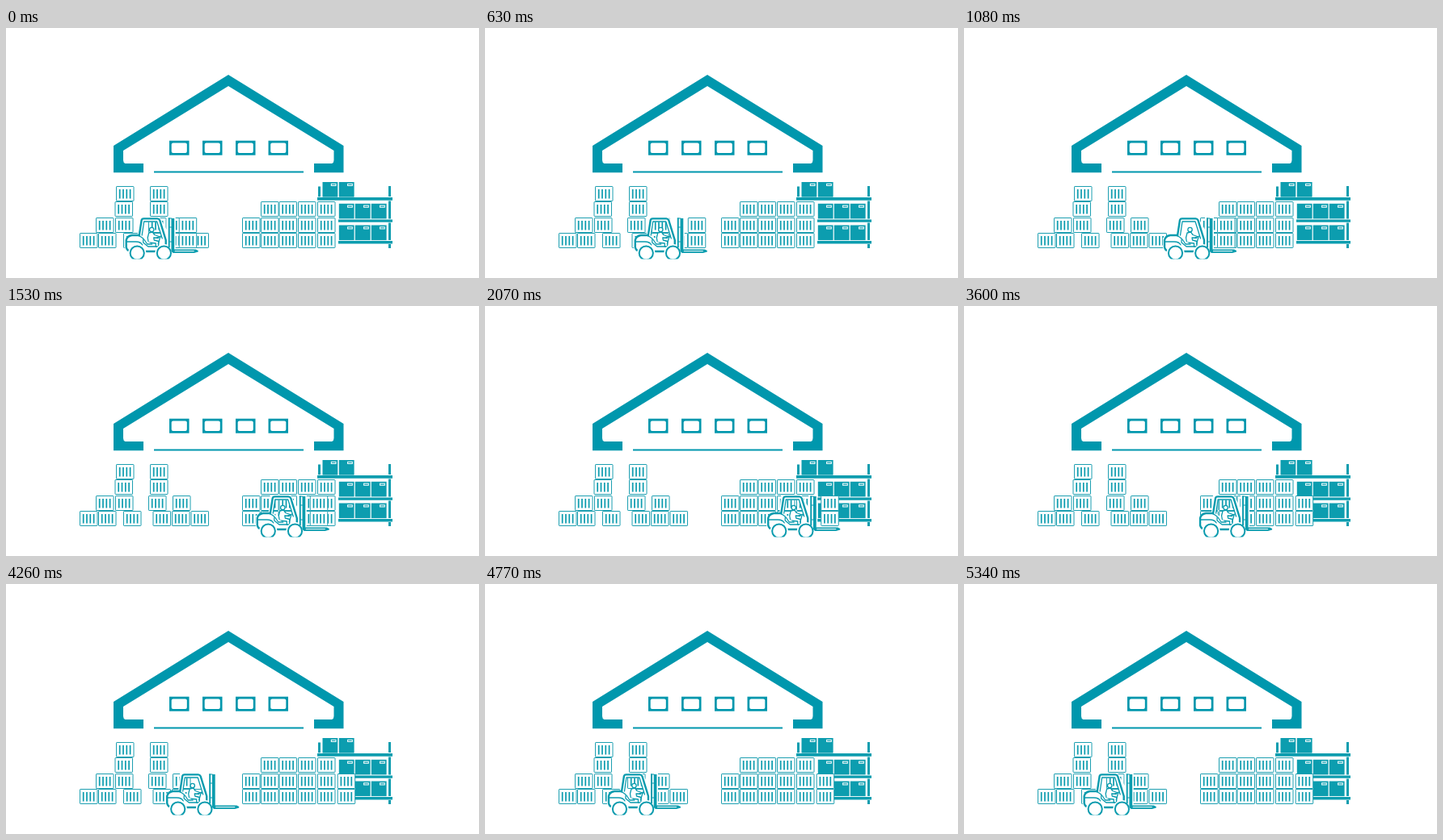
An HTML page for the animation above (5.37 s loop, 585 px wide and 310 px high).

```html
<!DOCTYPE html>
<html lang="en">
<head>
<meta charset="utf-8">
<title>Warehouse</title>
<style>
html, body { margin: 0; width: 100%; height: 100%; overflow: hidden; background: #fff; }
svg { display: block; width: 585px; height: 310px; }
.solid { fill: #0097ad; }
.goods { fill: #0c9daf; }
.line { fill: none; stroke: #0a9bae; stroke-linejoin: round; stroke-linecap: round; }
.paper { fill: #fff; }
</style>
</head>
<body>
<svg viewBox="0 0 585 310">
  <defs>
    <g id="crate">
      <rect x=".5" y=".5" width="21.5" height="18" rx=".6" fill="#fff" stroke="#1d9fb1"/>
      <path d="M4.700 4V15.500M9 4V15.500M13.300 4V15.500M17.600 4V15.500" fill="none" stroke="#0a9bae" stroke-width="1.700"/>
    </g>
    <g id="box">
      <rect class="goods" width="18.800" height="18.600"/>
      <path d="M10.300 3.400H17" stroke="#fff" stroke-width="3.200"/>
      <path d="M11.300 3.400H16" stroke="#0c9daf" stroke-width="1.200"/>
    </g>
    <g id="window">
      <rect class="solid" width="24.500" height="18"/>
      <rect class="paper" x="2.700" y="2.700" width="19.100" height="12.600" rx="2"/>
    </g>
    <clipPath id="ground"><rect x="-10" y="200" width="120" height="86.600"/></clipPath>
  </defs>

  <path class="solid" d="M275 58L417.500 146V179.200H381V168H403Q405.500 167 405.500 164V152L275 72L145 152V164Q145 167 147.500 168H170V179.200H133V146Z"/>
  <path d="M183 178.400H368" stroke="#0097ad" stroke-width="2"/>
  <g id="windows"></g>

  <g id="rack">
    <path class="goods" d="M385 210H478V213.700H385ZM411 237.400H478V240.800H411ZM411 264H478V267.500H411Z"/>
    <path class="goods" d="M473 196H476V209H473ZM473 214.500H476V236.500H473ZM473 241.500H476V263H473ZM473 268H476V273H473ZM386 196.500H389V209.300H386Z"/>
  </g>
  <g id="crates"></g>
  <g id="stored"></g>

  <g id="truck">
    <g clip-path="url(#ground)">
      <path class="paper" fill-rule="evenodd" d="M17 234H42L51 250V234H62V274H90V280H60L55 288H4L-1 275V260L15 256ZM23 240.500L20.500 256.500L24 260H45.500L39 240.500Z"/>
      <path class="line" stroke-width="2.400" d="M17 257H8Q2 258 1 263V272Q2 276 5 276.500M24 277H38M17 257.500L20 238Q20.500 236.400 22.500 236.400H39.500Q41.500 236.400 42.500 238.500L50 263V271"/>
      <path class="line" stroke-width="1.300" d="M20.500 257L23 240H39L45.500 261M1.500 265H13Q19 265 21 269M17 257.500L22 261V266L28 271H40"/>
      <g class="line" style="fill:#fff" stroke-width="1.300">
        <path d="M29 254L33.500 253L36 256.500L41.500 258.500L40.500 260.500L35 260L35.500 263L41 264.500V271H37.500V267L28.500 266L27.500 260Z"/>
        <circle cx="32.500" cy="250" r="2.700"/>
        <path d="M40.500 268L43 259M38.500 260L44 258M23 262L27 268H33"/>
      </g>
      <g class="line" style="fill:#fff">
        <g stroke="#fff" stroke-width="5"><circle cx="14.500" cy="279" r="8.600"/><circle cx="47.700" cy="279" r="8.600"/></g>
        <g stroke-width="2"><circle cx="14.500" cy="279" r="8.600"/><circle cx="47.700" cy="279" r="8.600"/></g>
      </g>
      <path class="goods" d="M53 235.500H55V272H53ZM56.700 236H60.500V274.500H87L90 276V277.500L85 279H59L56.700 277Z"/>
      <path class="line" stroke-width="1" d="M53.500 236H57M54.500 247H59M54.500 265H59"/>
      <path d="M61 276.700H85" stroke="#fff" stroke-width="1"/>
    </g>
    <g id="load"></g>
  </g>
</svg>
<script>
const LOOP = 5370, LEFT = 147.7, RIGHT = 350.3;
const OUT = 15, BACK = 2820, TRIP = 2160;
const PAUSE = [2940, 3180];
const rows = [196, 215, 235, 254];
const el = id => document.getElementById(id);

function put(parent, shape, x, y) {
  const u = document.createElementNS("http://www.w3.org/2000/svg", "use");
  u.setAttribute("href", "#" + shape);
  u.setAttribute("x", x);
  u.setAttribute("y", y);
  el(parent).append(u);
}

[202, 243, 284, 324.5].forEach(x => put("windows", "window", x, 139.7));

[[191, 391.5, 411.8], [217.8, 411.8, 431.8, 451.8], [244.5, 411.8, 431.8, 451.8]]
  .forEach(([y, ...xs]) => xs.forEach(x => put("rack", "box", x, y)));

[
  [136, 178],
  [134.5, 178, 315, 337.5, 361, 385],
  [111, 135, 176, 206, 292, 315, 337.5, 361, 385],
  [91, 114, 145, 181.5, 205, 228.5, 292, 315, 337.5, 361, 385]
].forEach((xs, i) => xs.forEach(x => put("crates", "crate", x, rows[i])));

rows.slice(2).forEach(y => {
  put("stored", "crate", 409.7, y);
  put("load", "crate", 66, y);
});

// Speeds up for a third, cruises for a third, slows down for a third.
function glide(p) {
  p = Math.min(1, Math.max(0, p));
  if (p < 1 / 3) return 2.25 * p * p;
  if (p > 2 / 3) return 1 - 2.25 * (1 - p) ** 2;
  return 1.5 * p - 0.25;
}

function draw(now) {
  let t = now % LOOP;
  if (t > PAUSE[0] && t < PAUSE[1]) t = PAUSE[0];
  const share = glide((t - OUT) / TRIP) - glide((t - BACK) / TRIP);
  const x = LEFT + (RIGHT - LEFT) * share;
  const dropped = t >= BACK;
  el("truck").setAttribute("transform", `translate(${x.toFixed(2)} 0)`);
  el("load").setAttribute("visibility", dropped ? "hidden" : "visible");
  el("stored").setAttribute("visibility", dropped ? "visible" : "hidden");
}

const start = performance.now();
function tick() {
  draw(performance.now() - start);
  requestAnimationFrame(tick);
}
tick();
</script>
</body>
</html>
```
